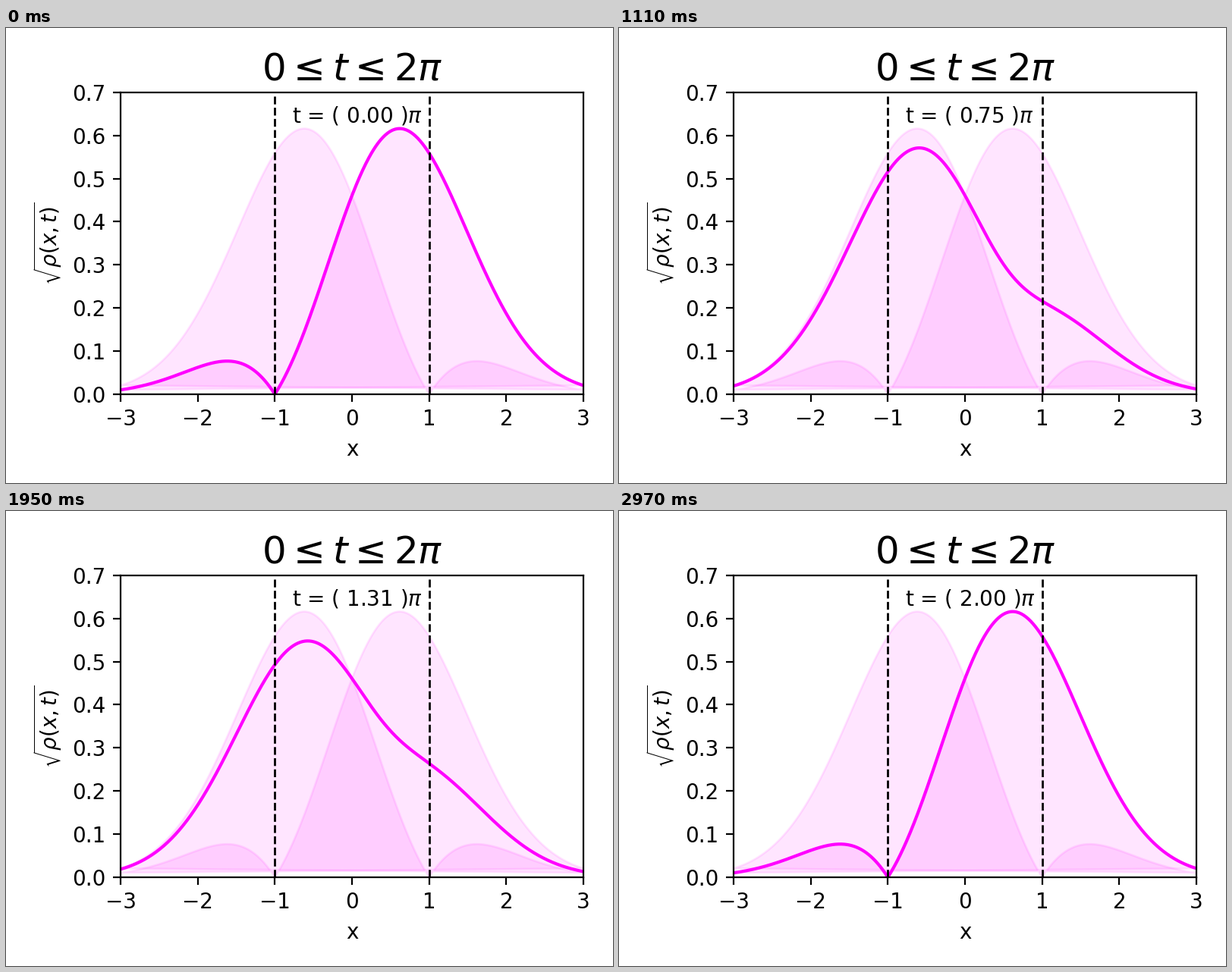
Recreate the animation shown at these times as a matplotlib script. Size 800x600 px, loop 3000 ms.

```python
import numpy as np
import matplotlib.pyplot as plt
from matplotlib.animation import FuncAnimation

W, H, DPI = 800, 600, 200
FRAMES, INTERVAL = 100, 30
MAGENTA = "magenta"

x = np.linspace(-3, 3, 601)


def root_density(t):
    """Equal mix of the two lowest oscillator-like states."""
    envelope = np.sqrt(2 / (3 * np.pi)) * np.exp(-x**2 / 2)
    return envelope * np.abs(1 + x * np.exp(-1j * t))


def time_text(t):
    return rf"t = ( {t / np.pi:.2f} )$\pi$"


fig, ax = plt.subplots(figsize=(W / DPI, H / DPI), dpi=DPI)
fig.subplots_adjust(left=151 / W, right=761 / W,
                    bottom=1 - 483 / H, top=1 - 84.7 / H)

ax.set_xlim(-3, 3)
ax.set_ylim(0, 0.7)
ax.set_xticks(np.arange(-3, 4))
ax.set_yticks(np.arange(8) / 10)
ax.set_title(r"$0 \leq t \leq 2\pi$", fontsize=18)
ax.set_xlabel("x")
ax.set_ylabel(r"$\sqrt{\rho(x,t)}$")

# Extreme positions of the packet
for t in (0, np.pi):
    ax.fill(x, root_density(t), color=MAGENTA, alpha=0.1)

curve, = ax.plot(x, root_density(0), color=MAGENTA, lw=1.5)
for edge in (-1, 1):
    ax.axvline(edge, color="black", ls="--", lw=1)
clock = ax.text(0.37, 0.9, time_text(0), transform=ax.transAxes)


def update(i):
    t = 2 * np.pi * i / (FRAMES - 1)
    curve.set_ydata(root_density(t))
    clock.set_text(time_text(t))
    return curve, clock


anim = FuncAnimation(fig, update, frames=FRAMES, interval=INTERVAL,
                     repeat=True, repeat_delay=0)
plt.show()
```
